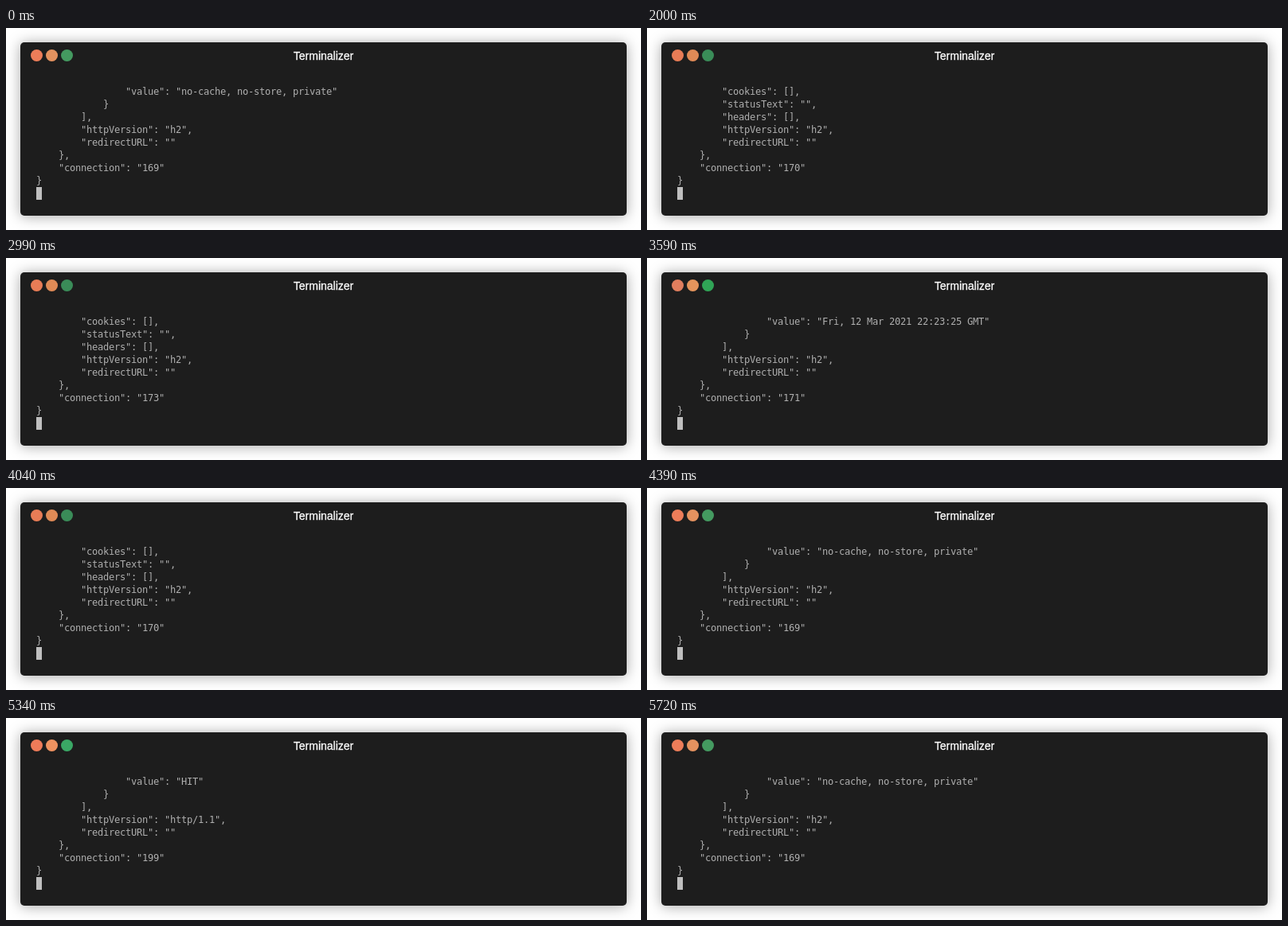
These frames come from a looping animation (797 by 254 pixels, 7720 ms). An HTML page:

```html
<!DOCTYPE html>
<html lang="en">
<head>
<meta charset="utf-8">
<title>Terminal</title>
<style>
  html, body { margin: 0; width: 100%; height: 100%; overflow: hidden; background: #fff; }
  #window {
    position: absolute; left: 18px; top: 18px; width: 761px; height: 218px;
    border-radius: 5px; background: #1d1d1d; box-shadow: 0 1px 17px rgba(0, 0, 0, .35);
  }
  #title {
    position: absolute; top: 9px; width: 100%; text-align: center; color: #fff;
    font: 14px/16px "Liberation Sans", Arial, sans-serif; -webkit-text-stroke: .3px #fff;
  }
  i { position: absolute; top: 9px; width: 15px; height: 15px; border-radius: 50%; }
  pre {
    position: absolute; left: 20px; top: 54px; margin: 0; color: #afafaf;
    font: 12px/16px "DejaVu Sans Mono", monospace; letter-spacing: -.224px;
  }
  #cursor { position: absolute; left: 20px; top: 182px; width: 7px; height: 16px; background: #bfbfbf; }
</style>
</head>
<body>
<div id="window">
  <i style="left:13px"></i><i style="left:32px"></i><i style="left:51px"></i>
  <div id="title">Terminalizer</div>
  <pre></pre>
  <div id="cursor"></div>
</div>
<script>
const LOOP = 7720;
const output = document.querySelector("pre");
const dots = document.querySelectorAll("i");

// Kinds of response: last header value, protocol, title bar button colours
const empty = { version: "h2", colors: ["#e87c56", "#df8a56", "#3a8c58"] };
const cache = { value: "no-cache, no-store, private", version: "h2", colors: ["#ed7d59", "#e4925f", "#449a60"] };
const date = { value: "Fri, 12 Mar 2021 22:23:25 GMT", version: "h2", colors: ["#e07e5e", "#e4945c", "#30a456"] };
const hit = { value: "HIT", version: "http/1.1", colors: ["#ee7b59", "#ee9260", "#3aa865"] };
const uuid = { value: "7c1f04be-52d9-4e83-a6b0-93d8e15f2a47", version: "h2", colors: date.colors };

// Start time, kind, connection
const steps = [
  [0, cache, 169], [2000, empty, 170], [2240, empty, 171], [2420, hit, 172], [2480, empty, 170],
  [2700, hit, 174], [2740, empty, 173], [2780, empty, 170], [2820, empty, 173], [2860, hit, 175],
  [2900, empty, 170], [2940, empty, 173], [2990, empty, 173], [3090, empty, 170], [3190, date, 171],
  [3290, empty, 173], [3390, date, 171], [3490, uuid, 171], [3590, date, 171], [3730, cache, 169],
  [3910, hit, 182], [3970, cache, 169], [4030, empty, 170], [4090, cache, 169], [4150, hit, 185],
  [4210, cache, 169], [4270, empty, 173], [4330, date, 171], [4390, cache, 169], [4490, hit, 190],
  [4590, cache, 169], [4690, date, 171], [4940, hit, 193], [5000, cache, 169], [5060, hit, 195],
  [5120, date, 171], [5180, hit, 197], [5240, cache, 169], [5290, hit, 198], [5340, hit, 199],
  [5440, cache, 169], [5620, date, 171], [5720, cache, 169]
];

const line = (indent, text) => " ".repeat(indent) + text;

function screenText({ value, version }, connection) {
  const head = value
    ? [line(16, `"value": "${value}"`), line(12, "}"), line(8, "],")]
    : [line(8, '"cookies": [],'), line(8, '"statusText": "",'), line(8, '"headers": [],')];
  return [
    ...head,
    line(8, `"httpVersion": "${version}",`),
    line(8, '"redirectURL": ""'),
    line(4, "},"),
    line(4, `"connection": "${connection}"`),
    "}"
  ].join("\n");
}

let shown;
function draw() {
  const time = performance.now() % LOOP;
  const step = steps.findLast(([start]) => start <= time);
  if (step !== shown) {
    const [, kind, connection] = shown = step;
    output.textContent = screenText(kind, connection);
    dots.forEach((dot, n) => dot.style.background = kind.colors[n]);
  }
  requestAnimationFrame(draw);
}
draw();
</script>
</body>
</html>
```
